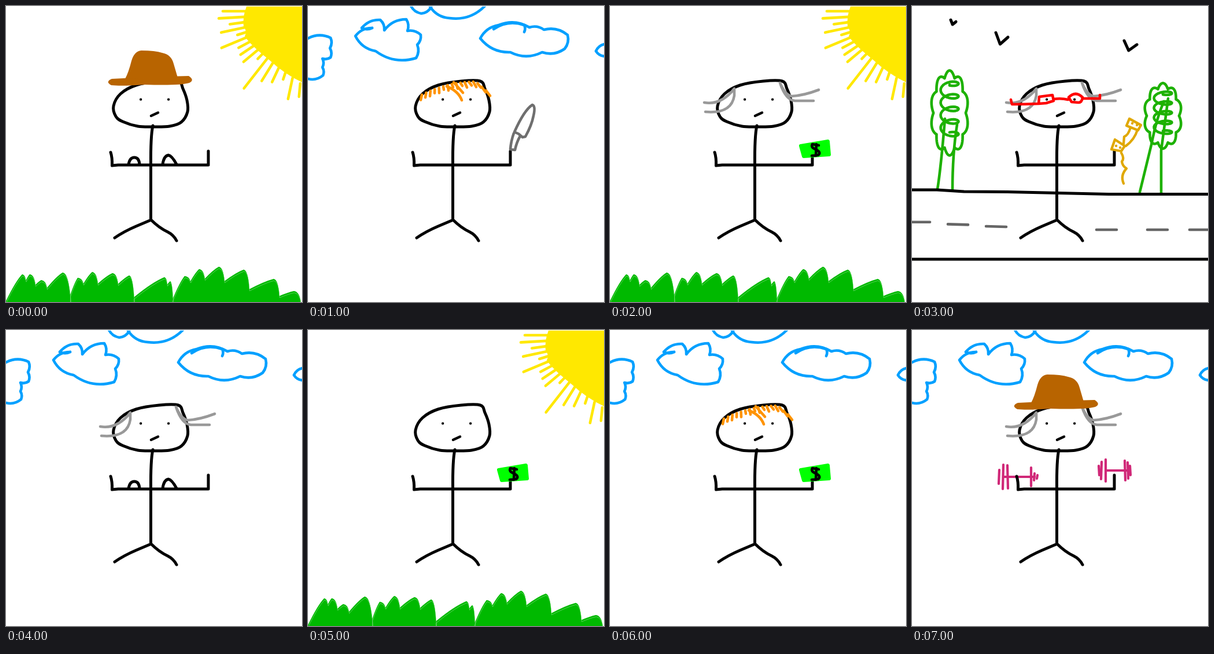
An HTML page with a canvas for the animation above (8 s loop, 512x512 px).

```html
<!DOCTYPE html>
<html lang="en">
<head>
<meta charset="utf-8">
<title>Stick figure</title>
<style>
html, body { margin: 0; width: 100%; height: 100%; overflow: hidden; background: #fff; }
canvas { display: block; width: 100vw; height: 100vh; }
</style>
</head>
<body>
<canvas id="stage" width="512" height="512"></canvas>
<script>
const ctx = document.getElementById('stage').getContext('2d');
ctx.lineCap = ctx.lineJoin = 'round';

const range = n => Array.from({ length: n }, (_, i) => i);
const parse = text => text.split(' ').map(p => p.split(',').map(Number));
const group = (...parts) => () => parts.forEach(part => part());
const asPath = shape => new Path2D(shape);

function line(shape, color, width = 4.6) {
  const path = asPath(shape);
  return () => {
    ctx.strokeStyle = color;
    ctx.lineWidth = width;
    ctx.stroke(path);
  };
}

function area(shape, color) {
  const path = asPath(shape);
  return () => {
    ctx.fillStyle = color;
    ctx.fill(path);
  };
}

// Closed round outline through a few points.
function blob(text) {
  const pts = parse(text), n = pts.length, path = new Path2D();
  const at = i => pts[(i + n) % n];
  path.moveTo(...pts[0]);
  for (const i of range(n)) {
    const [a, b, c, d] = [at(i - 1), at(i), at(i + 1), at(i + 2)];
    path.bezierCurveTo(b[0] + (c[0] - a[0]) / 6, b[1] + (c[1] - a[1]) / 6,
      c[0] - (d[0] - b[0]) / 6, c[1] - (d[1] - b[1]) / 6, c[0], c[1]);
  }
  return path;
}

// Corners joined by arcs that bulge to the left of the direction of travel.
function puffs(text, bulge = 0.5) {
  const pts = parse(text), path = new Path2D();
  path.moveTo(...pts[0]);
  pts.slice(1).forEach(([x, y], i) => {
    const [px, py] = pts[i];
    path.quadraticCurveTo((px + x) / 2 + (y - py) * bulge / 2, (py + y) / 2 - (x - px) * bulge / 2, x, y);
  });
  return path;
}

function sunRays() {
  const lengths = [38, 44, 25, 42, 16, 50, 24, 28, 32, 11, 65, 36, 27, 12, 37, 23];
  const cubic = (s, a, b, c, d) => a * (1 - s) ** 3 + 3 * b * s * (1 - s) ** 2 + 3 * c * s * s * (1 - s) + d * s ** 3;
  const path = new Path2D();
  lengths.forEach((length, i) => {
    const s = i / (lengths.length - 1);
    const x = cubic(s, 413, 405, 440, 509), y = cubic(s, 9, 60, 85, 134);
    const angle = Math.PI * (1 - 0.47 * s ** 1.2);
    path.moveTo(x, y);
    path.lineTo(x + length * Math.cos(angle), y + length * Math.sin(angle));
  });
  return path;
}

// Each blade climbs to its tip and drops to a notch whose depth follows the gap to the next tip.
function clump(left, right, base, tips) {
  const peaks = parse(tips), path = new Path2D();
  let x = left, y = base;
  path.moveTo(left, 512);
  path.lineTo(x, y);
  peaks.forEach(([px, py], i) => {
    path.quadraticCurveTo(px - (px - x) * 0.4, py + (y - py) * 0.25, px, py);
    const next = peaks[i + 1];
    const gap = next ? next[0] - px : 0;
    x = next ? px + Math.min(10, gap / 2) : right;
    y = next ? (py + next[1]) / 2 + 5 + gap * 0.4 : 512;
    path.quadraticCurveTo(px + (x - px) * 0.8, py + 1, x, y);
  });
  path.closePath();
  return path;
}

function foliage(cx, cy, rx, ry) {
  const path = new Path2D();
  for (const i of range(121)) {
    const a = i / 120 * 2 * Math.PI;
    const r = 0.9 + 0.15 * Math.abs(Math.sin(a * 5));
    path.lineTo(cx + rx * r * Math.cos(a), cy + ry * r * Math.sin(a));
  }
  path.moveTo(cx, cy - ry * 0.7);
  for (const i of range(101)) {
    const t = i / 100, a = t * 9 * Math.PI;
    path.lineTo(cx + rx * 0.5 * Math.sin(a), cy + ry * (1.4 * t - 0.8 + 0.12 * Math.cos(a)));
  }
  return path;
}

function fringe() {
  const path = new Path2D('M240 139Q260 147 266 163M252 132L268 150');
  for (const i of range(16)) {
    const x = 197 + i * 7.4;
    const y = x < 290 ? 131 + 22 * ((290 - x) / 92) ** 2 : 131 + (x - 290) * 0.85;
    path.moveTo(x, y);
    path.lineTo(x - 2 + i * 0.6, y + 9 - 4 * Math.sin(i / 15 * Math.PI) * (i % 2));
  }
  return path;
}

function dumbbell(from, to, y, plates) {
  const path = new Path2D(`M${from} ${y}H${to}`);
  for (const [x, half] of parse(plates)) {
    path.moveTo(x, y - half);
    path.lineTo(x + (half % 3 - 1), y + half);
  }
  return path;
}

function roadMarks() {
  const path = new Path2D();
  for (const x of [-4, 62, 128, 319, 407, 480]) {
    const y = Math.min(387, 374 + x * 0.055);
    path.moveTo(x, y);
    path.lineTo(x + 35, y + (x > 0 && x < 200 ? 1 : 0));
  }
  return path;
}

const bird = (x, y, w, h) => `M${x} ${y}l${w * 0.35} ${h}l${w * 0.65} ${-h * 0.6}`;

const sun = group(
  area('M416 1H512V132Q482 118 455 93Q420 65 413 52Q418 44 411 36Q409 18 416 1Z', '#ffe800'),
  line(sunRays(), '#ffe800'));

const grassShape = new Path2D();
grassShape.addPath(clump(0, 112, 510, '28,464 41,464 61,474 98,461'));
grassShape.addPath(clump(111, 222, 500, '124,470 149,460 184,462 213,466'));
grassShape.addPath(clump(221, 289, 504, '274,469 284,476'));
grassShape.addPath(clump(287, 510, 510, '309,467 334,455 368,451 411,456 463,472 498,493'));
const grassGlint = line(grassShape, '#7adb7a', 0.7);
const grass = group(area(grassShape, '#00b900'), () => {
  ctx.save();
  ctx.clip(grassShape);
  ctx.translate(0.5, 3);
  grassGlint();
  ctx.restore();
});

const cloudShapes = [
  '0,56 39,55 38,73 39,89 25,91 25,106 26,120 0,126',
  '111,38 93,38', '93,38 125,24 132,42 170,23 172,43 195,50 189,67 187,90 117,78 82,52 111,38',
  '213,2 196,13 178,0', '306,0 245,21 211,1',
  '298,56 330,33 383,37 408,41 449,50 444,74 405,80 350,80 298,56', '321,40 374,33 374,45',
  '513,87 498,78 513,66'
];
const clouds = group(...cloudShapes.map(shape => line(puffs(shape), '#00a0ff')));

const green = '#1db100';
const trees = group(
  line(foliage(65, 185, 31, 70), green),
  line(foliage(434, 190, 31, 54), green),
  line('M44 317Q50 280 57 195M70 319Q70 255 78 205M394 322L414 240Q424 190 436 165M431 324V250L443 160', green));

const road = group(
  trees,
  line('M0 318H43L90 321L165 321.5L340 325.5H512M0 438H512', '#000', 5),
  line(bird(67, 24, 9, 8) + bird(145, 46, 21, 20) + bird(367, 60, 22, 17), '#000', 5),
  line(roadMarks(), '#666'));

const body = group(
  line(blob('298,130 265,130 225,137 198,152 186,173 190,191 202,200 228,208 255,209 283,208 303,201 314,183 313,163 306,143'), '#000', 5),
  line('M254 207Q250 225 250.5 275V369M188 401Q204 390 225 381L251 370Q265 384 280 391Q290 396 295 406', '#000', 5),
  line('M181 253Q184 262 183.5 276L194 275H350V251', '#000', 5),
  line('M251 190L263 184.5', '#000', 4.5),
  line('M233 161.7h.2M281 161.7h.2', '#000', 4.2));

const hat = group(
  area('M183 126Q250 122 316 121Q327 128 317 133Q300 138 240 136Q200 139 182 137Q171 131 183 126Z', '#b86400'),
  area('M206 126Q212 115 217 95Q222 78 234 77Q258 77 270 81Q286 84 290 100L297 124Z', '#b86400'));

const greyHair = line('M163 167Q192 172 215 143V155Q210 187 165 183M352 164H320Q304 163 294 133Q303 154 314 156Q335 155 361 145', '#999');
const orangeHair = line(fringe(), '#ff9300');
const glasses = line('M171 162L173 170Q195 170 219 169L220 157L243 154L245 164L232 168L219 169M245 161Q258 159 270 162' +
  'M271 158Q283 146 295 158Q294 167 288 167L276 166ZM295 160H325V154', '#ff0000');

const curves = line('M212 274Q214 262 222 262Q230 262 231 274M271 274Q273 259 281 258Q287 259 295 274', '#000', 5);
const knife = line('M357 218Q374 180 388 171Q394 173 390 190Q387 206 376 226L371 227L364 221ZM356 220Q351 234 350 248L358 249Q361 235 367 225', '#6f6f6f');

const note = 'M330 242L377 234L379 257L335 260Z';
const money = group(
  area(note, '#00ff00'),
  line(note, '#00ff00', 6),
  line('M361 241L350 239Q347 245 356 248Q366 253 360 258L349 259M357 239L356 259', '#000'));

const phone = line('M376 195L396 206L391 215L371 207ZM351 231L368 242L362 251L345 248Z' +
  'M378 210Q374 224 367 226L366 238M390 214Q385 231 370 242M353 242h.2M360 245h.2M381 203h.2M389 206h.2' +
  'M362 254Q368 264 363 269Q364 277 371 281Q360 293 366 307', '#e0a800', 4.3);

const dumbbells = group(
  line(dumbbell(159, 212, 254, '151,12 158,21 165,20 206,16 212,6 217,3'), '#d02878', 4.2),
  line(dumbbell(337, 372, 243, '323,8 328,15 335,19 368,17 373,14 377,8'), '#d02878', 4.2));

const meadow = group(sun, grass);
const scenes = [
  [meadow, body, curves, hat],
  [clouds, body, orangeHair, knife],
  [meadow, body, greyHair, money],
  [road, body, greyHair, glasses, phone],
  [clouds, body, greyHair, curves],
  [meadow, body, money],
  [clouds, body, orangeHair, money],
  [clouds, dumbbells, body, greyHair, hat]
];

function draw() {
  const scene = scenes[Math.floor(performance.now() / 1000) % scenes.length];
  ctx.fillStyle = '#fff';
  ctx.fillRect(0, 0, 512, 512);
  ctx.save();
  ctx.beginPath();
  ctx.rect(0, 1, 512, 511);
  ctx.clip();
  scene.forEach(part => part());
  ctx.restore();
  requestAnimationFrame(draw);
}
draw();
</script>
</body>
</html>
```
